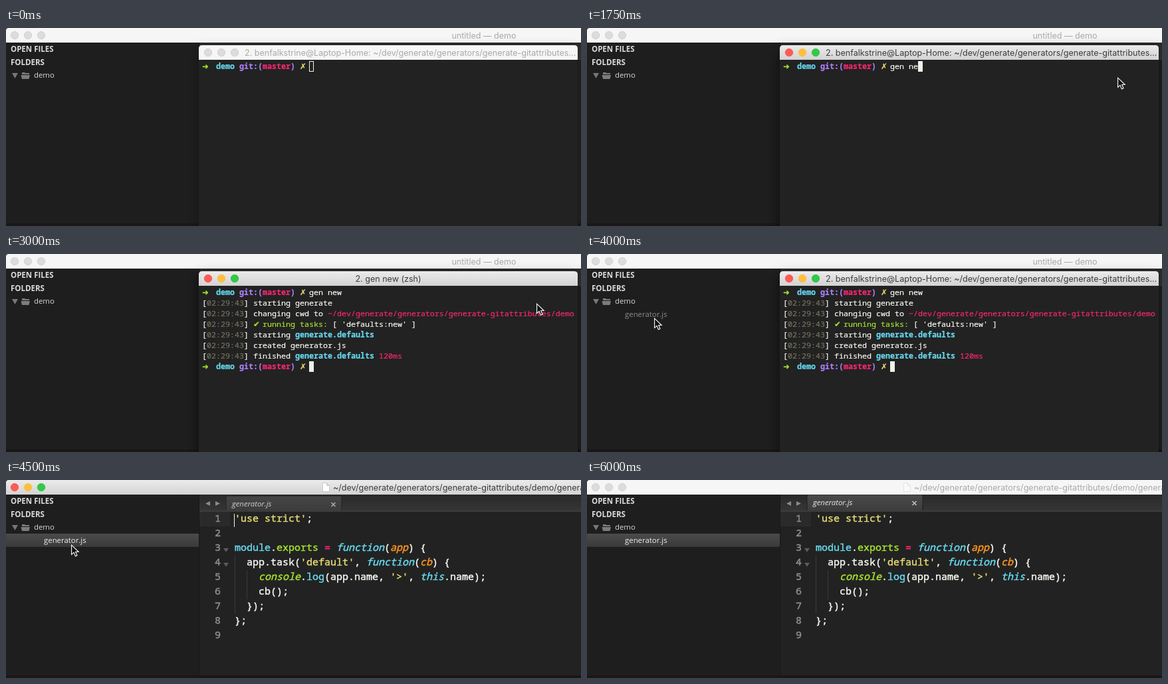
Recreate the animation shown at these times as an HTML page. Size 865 by 299 pixels, loop 6250 ms.

```html
<!DOCTYPE html>
<html lang="en">
<head>
<meta charset="utf-8">
<title>Generator demo</title>
<style>
  html, body { margin: 0; width: 100%; height: 100%; overflow: hidden; background: #1e1e1e; }
  svg { display: block; width: 865px; height: 299px; }
  text { white-space: pre; }
  .title { font: 12.55px Inter, sans-serif; }
  .side { font: 11.4px "Open Sans", sans-serif; fill: #d8d8d8; }
  .head { font: bold 11.5px "Open Sans", sans-serif; fill: #dadada; }
  .tab { font: italic 11.4px "Open Sans", sans-serif; fill: #e8e8e8; }
  .term { font: 11.667px "Noto Sans Mono", "DejaVu Sans", monospace; stroke-width: .2; }
  .code { font: 15px "Noto Sans Mono", monospace; stroke-width: .45; }
</style>
</head>
<body>
<svg id="stage" viewBox="0 0 865 299" xmlns="http://www.w3.org/2000/svg">
  <defs>
    <linearGradient id="bar" x2="0" y2="1"><stop stop-color="#ebebeb"/><stop offset="1" stop-color="#d3d3d3"/></linearGradient>
    <linearGradient id="row" x2="0" y2="1"><stop stop-color="#4b4b4b"/><stop offset="1" stop-color="#3a3a3a"/></linearGradient>
    <linearGradient id="tabs" x2="0" y2="1"><stop stop-color="#292929"/><stop offset="1" stop-color="#363636"/></linearGradient>
    <linearGradient id="tabFill" x2="0" y2="1"><stop stop-color="#4a4a4a"/><stop offset="1" stop-color="#3c3c3c"/></linearGradient>
    <filter id="blur" x="-20%" y="-20%" width="140%" height="140%"><feGaussianBlur stdDeviation="10"/></filter>
  </defs>

  <g id="sidebar">
    <rect y="22" width="290" height="277" fill="#1e1e1e"/>
    <text class="head" x="7" y="36">OPEN FILES</text>
    <text class="head" x="7" y="56">FOLDERS</text>
    <path d="M9 68h9l-4.5 8z" fill="#777"/>
    <path d="M24 70v-3h4l1 1h6v2zM22.500 71h13.500l-1.500 6h-10.500z" fill="#7c7c7c"/>
    <text class="side" x="42" y="75">demo</text>
    <rect id="selection" y="81" width="290" height="20" fill="url(#row)"/>
    <text id="file" class="side" x="57" y="95">generator.js</text>
  </g>

  <g id="editor">
    <rect x="290" y="22" width="575" height="26" fill="url(#tabs)"/>
    <path d="M307 32v7l-7-3.500zM315 32v7l7-3.500z" fill="#8a8a8a"/>
    <g id="tab">
      <path d="M331 48V24q0-2 2-2h170q2 0 2 2v24z" fill="url(#tabFill)" stroke="#1f1f1f"/>
      <text class="tab" x="340" y="38">generator.js</text>
      <path d="M489.500 32l6 6m0-6l-6 6" stroke="#c4c4c4" stroke-width="1.500"/>
    </g>
    <rect x="290" y="46" width="575" height="2" fill="#3c3c3c"/>
    <rect x="290" y="48" width="575" height="251" fill="#222"/>
    <path d="M290.500 22v277" stroke="#181818"/>
    <g id="code">
      <rect x="291" y="48" width="46" height="22" fill="#2a2a2a"/>
      <path d="M344.500 114v88M362.500 136v44" stroke="#3a3a36"/>
      <path d="M327 103h8l-4 6zM327 125h8l-4 6z" fill="#5c5c5c"/>
    </g>
    <rect id="caret" x="343" y="51" width="1" height="20" fill="#f8f8f0"/>
  </g>
  <rect y="295" width="865" height="4" fill="#1b1718"/>

  <g id="window">
    <path id="windowBar" d="M0 22V4q0-4 4-4h861v22z"/>
    <g id="windowLights"></g>
    <path id="page" d="M476.500 4.500h6l4 4v9h-10zM482.500 4.500v4h4" fill="#fff" stroke="#c0c0c0" stroke-width=".8"/>
    <text id="windowTitle" class="title" y="16"></text>
  </g>

  <g id="terminal">
    <rect id="shadow" x="290" y="34" width="570" height="290" filter="url(#blur)"/>
    <path d="M290 47h570v252h-570z" fill="#222"/>
    <path id="termBar" d="M290 48V31q0-5 5-5h560q5 0 5 5v17z"/>
    <g id="termLights"></g>
    <text id="termTitle" class="title" y="42"></text>
    <rect id="cursor"/>
    <g id="rows"></g>
  </g>

  <path id="mouse" d="M.6 1.200V15.600L4 12.400 6.400 18 9 17 6.700 11.500H11.200Z" fill="#111" stroke="#fff" stroke-width="1.100"/>
</svg>
<script>
const LOOP = 6250, STEP = 250;
const CELL = 7, ROW = 16, LEFT = 295;
const COLORS = {
  w: '#f8f8f2', d: '#75715e', g: '#a6e22e', c: '#66d9ef',
  p: '#f92672', u: '#ae81ff', y: '#e6db74', o: '#fd971f'
};
const LIGHTS = ['#fc5b57', '#fdbe41', '#34c84a'];
const PATH = '~/dev/generate/generators/generate-gitattributes';
const LONG_TITLE = `2. benfalkstrine@Laptop-Home: ${PATH}…`;

const $ = id => document.getElementById(id);
const set = (node, attrs) => {
  for (const key in attrs) node.setAttribute(key, attrs[key]);
  return node;
};
const add = (parent, tag, attrs) =>
  parent.appendChild(set(document.createElementNS('http://www.w3.org/2000/svg', tag), attrs));
const show = (id, on) => set($(id), { visibility: on ? 'visible' : 'hidden' });
const ink = color => ({ fill: color, stroke: color });

// Segments are split by "|"; each begins with a colour key, upper case for emphasis.
function addLine(parent, source, x, y, cell, emphasis) {
  const text = add(parent, 'text', { class: parent.id === 'code' ? 'code' : 'term', y });
  let column = 0;
  for (const segment of source.split('|')) {
    const key = segment[0], words = segment.slice(1);
    const span = add(text, 'tspan', { x: x + column * cell, ...ink(COLORS[key.toLowerCase()]) });
    if (key !== key.toLowerCase()) set(span, emphasis);
    span.textContent = words;
    column += words.length;
  }
  return text;
}

const PROMPT = 'G➜|w  |Cdemo|w |Ugit:(|Pmaster|U)|w |Y✗|w ';
const PROMPT_LENGTH = 23;
const stamp = rest => 'w[|d02:29:43|w] ' + rest;
const rows = [
  PROMPT + '|w',
  stamp('starting generate'),
  stamp(`changing cwd to |p${PATH}/demo`),
  stamp("|g✔ |grunning tasks:|w [ 'defaults:new' ]"),
  stamp('starting |Cgenerate.defaults'),
  stamp('created generator.js'),
  stamp('finished |Cgenerate.defaults|w |p120ms'),
  PROMPT
].map((source, i) => addLine($('rows'), source, LEFT, 62 + i * ROW, CELL, { 'font-weight': 'bold' }));
const typed = rows[0].lastChild;

[
  "y'use strict'|w;",
  'w',
  'cmodule|w.|gexports|w |p=|w |Cfunction|w(|Oapp|w) {',
  "w  app.task(|y'default'|w, |Cfunction|w(|Ocb|w) {",
  "w    |Gconsole|w.|clog|w(app.name, |y'>'|w, |Cthis|w.name);",
  'w    cb();',
  'w  });',
  'w};',
  'w'
].forEach((source, i) => {
  const y = 63 + i * 22;
  add($('code'), 'text', { class: 'code', x: 314, y, ...ink('#8f908a') }).textContent = i + 1;
  addLine($('code'), source, 344, y, 9, { 'font-style': 'italic' });
});

function addLights(id, x, y) {
  LIGHTS.forEach((_, i) => add($(id), 'circle', { cx: x + i * 20, cy: y, r: 5.7 }));
}
addLights('windowLights', 13, 11);
addLights('termLights', 304, 37);

function setActive(prefix, active) {
  set($(prefix + 'Bar'), { fill: active ? 'url(#bar)' : '#f6f6f6' });
  set($(prefix + 'Title'), { fill: active ? '#3c3c3c' : '#a9a9a9' });
  [...$(prefix + 'Lights').children].forEach((light, i) =>
    set(light, { fill: active ? LIGHTS[i] : '#dcdcdc', stroke: active ? LIGHTS[i] : '#d2d2d2' }));
}

function setTitle(id, words, x, anchor = 'start') {
  set($(id), { x, 'text-anchor': anchor }).textContent = words;
}

// Last value whose start time has been reached.
const at = (t, steps) => steps.filter(([start]) => t >= start).pop()[1];

const TYPING = [[0, ''], [1250, 'ge'], [1500, 'gen '], [1750, 'gen ne'], [2000, 'gen new']];
const ROW_COUNT = [[0, 1], [2250, 2], [2750, 4], [3000, 8]];
const FILE_OPACITY = [[0, 0], [3250, .12], [3500, 1]];
const POINTER = [
  [0, null], [500, [798, 74]], [3250, [725, 111]], [3500, [717, 110]], [3750, [269, 91]],
  [4000, [101, 96]], [4250, [98, 97]], [4750, [98, 102]], [5000, [218, 194]],
  [5250, [836, 203]], [5500, null]
];

function drawTerminal(t) {
  const active = t >= 750, running = t >= 2250 && t < 3250;
  const input = at(t, TYPING), count = at(t, ROW_COUNT);
  setActive('term', active);
  set($('shadow'), { 'fill-opacity': active ? .6 : .3 });
  if (running) setTitle('termTitle', '2. gen new (zsh)', 575, 'middle');
  else setTitle('termTitle', LONG_TITLE, 359);

  typed.textContent = input;
  rows.forEach((row, i) => set(row, { display: i < count ? 'inline' : 'none' }));

  const line = count === 1 ? 0 : count === 8 ? 7 : count;
  const column = line === 0 ? PROMPT_LENGTH + input.length : line === 7 ? PROMPT_LENGTH : 0;
  const inset = active ? 0 : .5;
  set($('cursor'), {
    x: LEFT + column * CELL + inset, y: 50 + line * ROW + inset,
    width: CELL - 2 * inset, height: ROW - 2 * inset,
    fill: active ? '#f1f1ec' : 'none', stroke: active ? 'none' : '#f1f1ec'
  });
}

function drawEditor(t) {
  const open = t >= 4250, loaded = t >= 4500, settled = t >= 4750;
  const active = loaded && t < 6000;
  setActive('window', active);
  if (loaded) setTitle('windowTitle', PATH + '/demo/generator.js', 492);
  else setTitle('windowTitle', 'untitled — demo', 719, 'middle');
  show('page', loaded);
  set($('page'), { opacity: active ? 1 : .45 });
  show('tab', loaded);
  set($('tab'), { transform: `translate(0 ${settled ? 0 : 2})`, opacity: settled ? 1 : .85 });
  show('code', open);
  show('selection', open);
  set($('file'), { opacity: at(t, FILE_OPACITY), style: `fill:${open ? '#f0f0f0' : '#8c8c8c'}` });
  show('caret', open && t < 6000 && (t < 5000 || t / STEP % 2 === 1));
}

function render(now) {
  const t = Math.floor(now % LOOP / STEP) * STEP;
  drawEditor(t);
  drawTerminal(t);
  set($('terminal'), { display: t < 4250 ? 'inline' : 'none' });
  const spot = at(t, POINTER);
  show('mouse', spot);
  if (spot) set($('mouse'), { transform: `translate(${spot})` });
}

const start = performance.now();
(function tick() {
  render(performance.now() - start);
  requestAnimationFrame(tick);
})();
</script>
</body>
</html>
```
